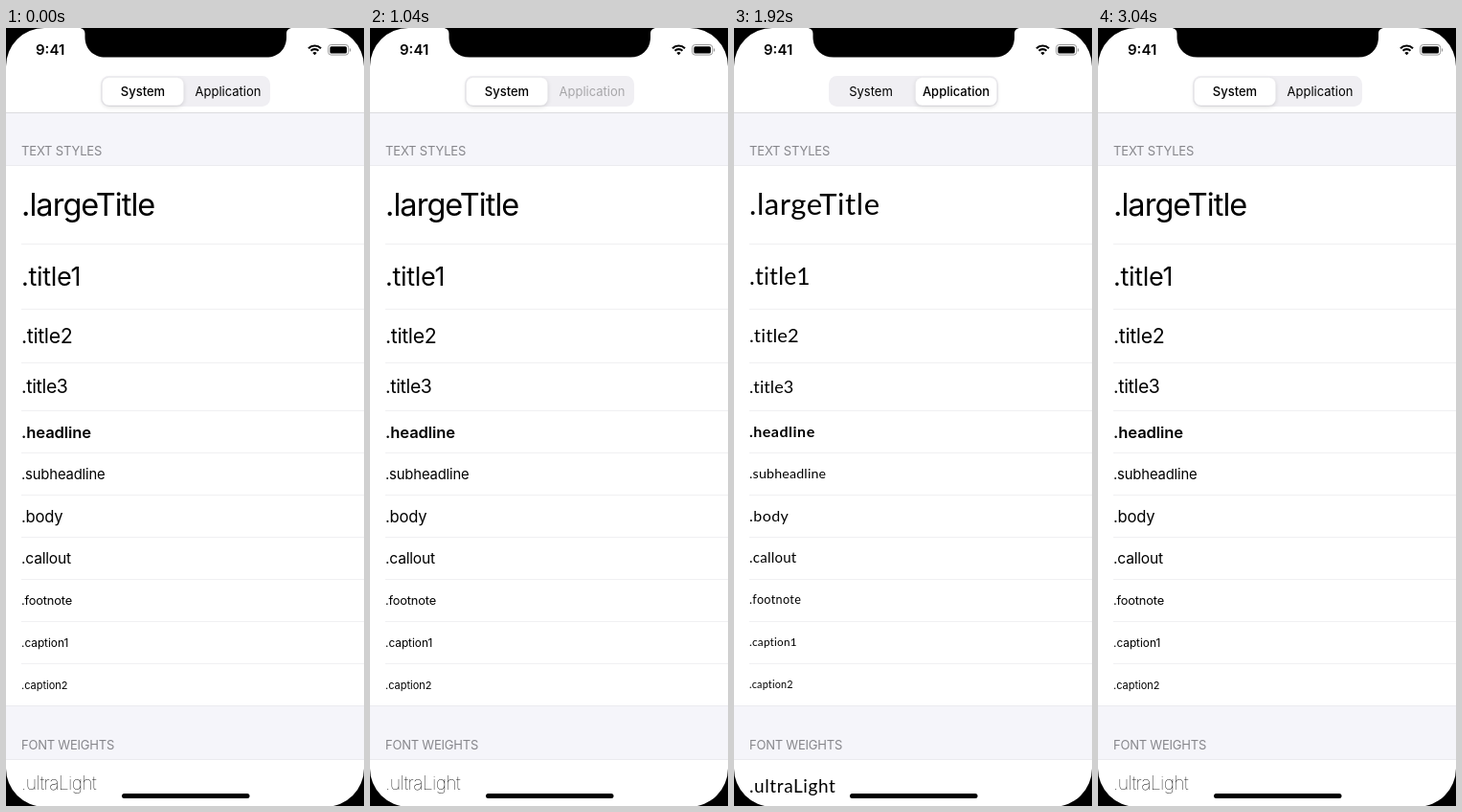
An HTML page for the animation above (3080 ms loop, 374x812 px).

```html
<!DOCTYPE html>
<html lang="en">
<head>
<meta charset="utf-8">
<title>Text styles</title>
<style>
  html, body { margin: 0; width: 100%; height: 100%; overflow: hidden; background: #000; }
  svg { display: block; width: 100vw; height: 100vh; }
  text { font-family: Inter, sans-serif; white-space: pre; }
  .app text { font-family: Lato, sans-serif; }
  .head { font-size: 13px; fill: #86868b; }
  .label { font-size: 13px; text-anchor: middle; }
</style>
</head>
<body>
<svg viewBox="0 0 374 812">
  <defs>
    <clipPath id="screen"><rect width="374" height="812.8" rx="40"/></clipPath>
    <filter id="shadow" x="-20%" y="-30%" width="140%" height="170%">
      <feDropShadow dx="0" dy="1.5" stdDeviation="2" flood-color="#000" flood-opacity=".14"/>
    </filter>
  </defs>
  <rect width="374" height="812"/>
  <g clip-path="url(#screen)">
    <rect width="374" height="813" fill="#fff"/>
    <rect y="89" width="374" height="55" fill="#f5f5fa"/>
    <rect y="707" width="374" height="57" fill="#f5f5fa"/>
    <rect y="88" width="374" height="1" fill="#dcdcdf"/>
    <g id="lines"></g>
    <text class="head" x="16" y="133.3" letter-spacing="-.15">TEXT STYLES</text>
    <text class="head" x="16" y="753.3" letter-spacing="-.22">FONT WEIGHTS</text>
    <g id="system"></g>
    <g id="app" class="app"></g>

    <rect x="99" y="50" width="177" height="32" rx="8.5" fill="#f0eff3"/>
    <rect id="thumb" x="100.6" y="51.8" width="85" height="29" rx="7" fill="#fff"
          stroke="#000" stroke-opacity=".05" stroke-width=".6" filter="url(#shadow)"/>
    <text id="left" class="label" x="143" y="70.6">System</text>
    <text id="right" class="label" x="232" y="70.6">Application</text>
    <circle id="touch" r="20" fill="#cbcbcb" fill-opacity=".76" stroke="#8e8e8e" stroke-opacity=".75"/>

    <text x="31" y="28.3" font-size="15" font-weight="600">9:41</text>
    <g fill="none" stroke="#000" stroke-width="2.1">
      <path d="M316 21.2a9.2 9.2 0 0 1 13 0"/>
      <path d="M318.5 23.8a5.7 5.7 0 0 1 8 0"/>
    </g>
    <path d="M322.5 28.2l-2.2-2.2a3.1 3.1 0 0 1 4.4 0z"/>
    <rect x="336.7" y="17.5" width="21" height="10.6" rx="2.8" fill="none" stroke="#999"/>
    <rect x="338.4" y="19.2" width="17.6" height="7.2" rx="1.5"/>
    <path d="M359 21v3.8q1.3-.5 1.3-1.9t-1.3-1.9z" fill="#999"/>
    <rect x="121" y="799" width="133.5" height="5" rx="2.5"/>
  </g>
  <path d="M76 0C80.5 0 82.5 2.5 82.5 6V9.5C82.5 21.5 91 30.6 104 30.6H272C285 30.6 293 21.5 293 9.5V6C293 2.5 295 0 299.5 0Z"/>
</svg>
<script>
const LOOP = 3080;
const $ = id => document.getElementById(id);

function add(parent, tag, attrs, text) {
  const el = document.createElementNS('http://www.w3.org/2000/svg', tag);
  for (const k in attrs) el.setAttribute(k, attrs[k]);
  if (text) el.textContent = text;
  parent.appendChild(el);
}

// name, baseline, then size and tracking for each of the two fonts
const rows = [
  ['largeTitle', 196.3, 32.5, -.95, 31, .6],
  ['title1', 269.3, 27, -.3, 24.6, .2],
  ['title2', 329.2, 21.3, -.35, 20, .15],
  ['title3', 381.4, 19.4, -.35, 18, .1],
  ['headline', 427.6, 16.6, -.1, 16, .5],
  ['subheadline', 470.8, 14.8, -.15, 14.2, .2],
  ['body', 515.5, 16.6, -.2, 16, .45],
  ['callout', 559.1, 15.6, -.2, 15, .25],
  ['footnote', 602.1, 12.8, -.15, 12.6, .35],
  ['caption1', 645.9, 11.8, 0, 11.7, .25],
  ['caption2', 689.5, 11, 0, 10.8, .2],
  ['ultraLight', 794.8, 19.4, -.6, 19, .6]
];
const weights = { headline: [600, 700], ultraLight: [100, 400] };

for (const [name, y, size, track, appSize, appTrack] of rows) {
  const [w, appW] = weights[name] || [400, 400];
  const put = (list, y, size, track, weight) => add($(list), 'text',
    { x: 16, y, 'font-size': size, 'letter-spacing': track, 'font-weight': weight }, '.' + name);
  put('system', y, size, track, w);
  put('app', name === 'ultraLight' ? y + 3 : y - .9, appSize, appTrack, appW);
}

const line = (x, y, fill) => add($('lines'), 'rect', { x, y, width: 374 - x, height: 1, fill });
[225, 293, 349].forEach(y => line(16, y, '#f0f0f2'));
for (let y = 399; y < 700; y += 44) line(16, y, '#f0f0f2');
[143, 707, 763].forEach(y => line(0, y, '#ebebef'));

const clamp = v => Math.max(0, Math.min(1, v));
const ease = v => 1 - (1 - clamp(v)) ** 3;

const taps = [
  { down: 840, up: 1050, end: 1360, x: 233.8, y: 68 },
  { down: 2520, up: 2764, end: 3040, x: 169.5, y: 71 }
];

// Label fades while pressed and recovers after release
function labelAlpha(t, { down, up }) {
  return t < up ? 1 - .7 * clamp((t - down) / 160) : .3 + .7 * clamp((t - up) / 140);
}

function draw(t) {
  const [go, back] = taps;
  const inApp = t >= go.up && t < back.up;
  const slide = tap => ease((t - tap.up) / (tap.end - tap.up));
  $('thumb').setAttribute('transform', `translate(${89 * (slide(go) - slide(back))} 0)`);

  $('system').setAttribute('visibility', inApp ? 'hidden' : 'visible');
  $('app').setAttribute('visibility', inApp ? 'visible' : 'hidden');
  $('left').setAttribute('font-weight', inApp ? 400 : 500);
  $('right').setAttribute('font-weight', inApp ? 500 : 400);
  $('right').setAttribute('opacity', labelAlpha(t, go));
  $('left').setAttribute('opacity', labelAlpha(t, back));

  const tap = t < go.end ? go : back;
  const age = t - tap.down;
  const touch = $('touch');
  touch.setAttribute('cx', tap.x);
  touch.setAttribute('cy', tap.y);
  touch.setAttribute('opacity', age < 0 ? 0 : 1 - clamp((age - 100) / 100));
}

function tick() {
  draw(performance.now() % LOOP);
  requestAnimationFrame(tick);
}
tick();
</script>
</body>
</html>
```
